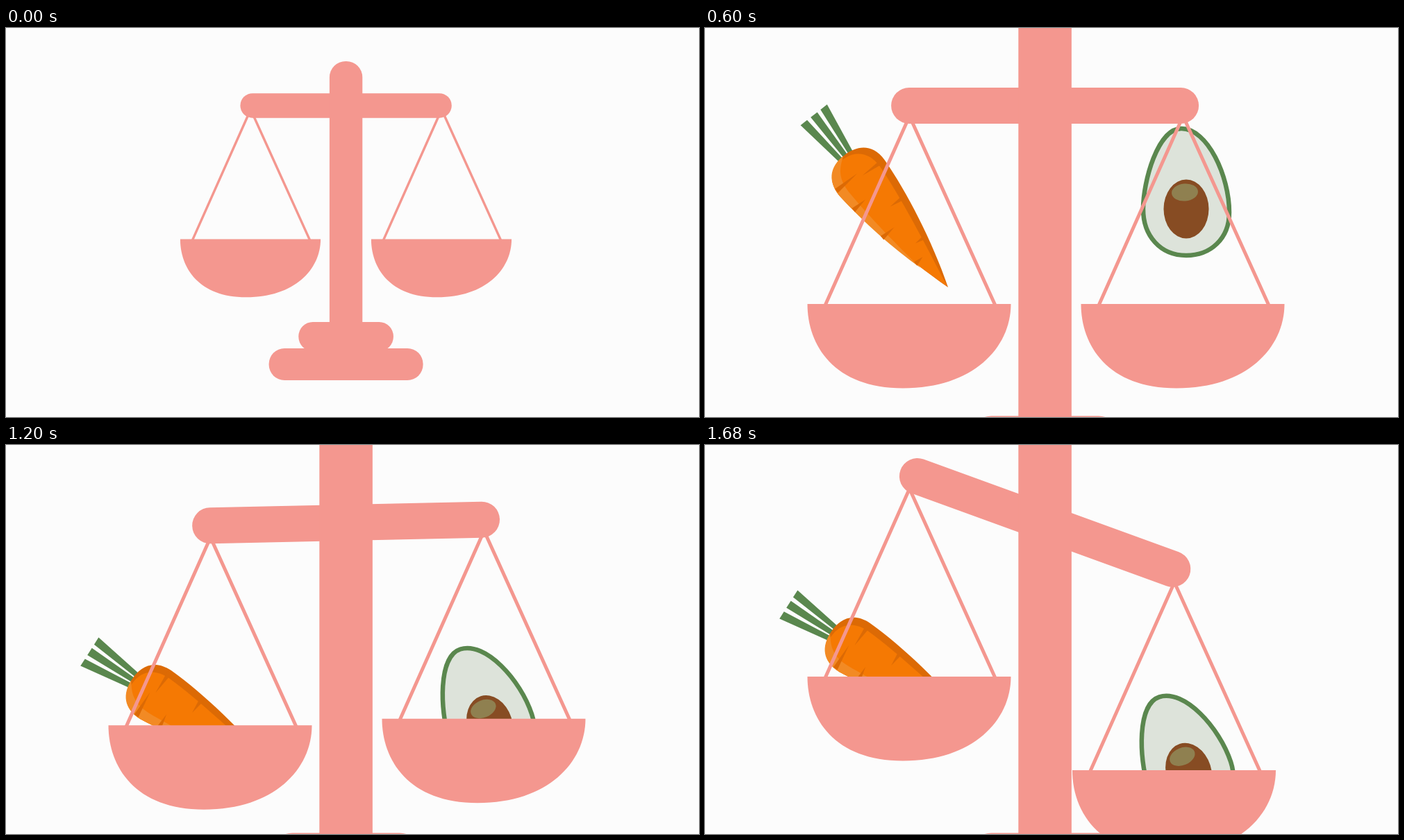
These frames come from a looping animation (998x561 px, 2 s). An HTML page with a canvas:

```html
<!DOCTYPE html>
<html lang="en">
<head>
<meta charset="utf-8">
<title>Balance scale</title>
<style>
html, body { margin: 0; width: 100%; height: 100%; overflow: hidden; background: #fcfcfc; }
canvas { display: block; }
</style>
</head>
<body>
<canvas id="stage" width="998" height="561"></canvas>
<script>
const ctx = document.getElementById('stage').getContext('2d');
const PINK = '#f4978f', GREEN = '#5a874e', DARK = '#dc6a05';
const LOOP = 2000, STEP = 40, LAST = 1680;
const CENTER = 489.6;

const lerp = (a, b, p) => a + (b - a) * p;

// Linear interpolation through [time, value] pairs, clamped at both ends
function track(t, keys) {
  if (t <= keys[0][0]) return keys[0][1];
  for (let i = 1; i < keys.length; i++) {
    const [t0, a] = keys[i - 1], [t1, b] = keys[i];
    if (t <= t1) return lerp(a, b, (t - t0) / (t1 - t0));
  }
  return keys[keys.length - 1][1];
}

const swing = (t, ...values) =>
  track(t, [680, 1020, 1340, 1680].map((time, i) => [time, values[i]]));

function place(x, y, degrees, scale, draw) {
  ctx.save();
  ctx.translate(x, y);
  ctx.rotate(degrees * Math.PI / 180);
  ctx.scale(scale, scale);
  draw();
  ctx.restore();
}

function fill(color, path) {
  ctx.fillStyle = color;
  ctx.fill(new Path2D(path));
}

function stroke(color, width, path) {
  ctx.strokeStyle = color;
  ctx.lineWidth = width;
  ctx.stroke(new Path2D(path));
}

function bar(x, y, w, h, r) {
  ctx.fillStyle = PINK;
  ctx.beginPath();
  ctx.roundRect(x, y, w, h, r);
  ctx.fill();
}

function ellipse(color, x, y, rx, ry, angle = 0) {
  ctx.fillStyle = color;
  ctx.beginPath();
  ctx.ellipse(x, y, rx, ry, angle, 0, Math.PI * 2);
  ctx.fill();
}

// Lies along the x axis, tip on the right
function carrot() {
  for (const [end, base] of [[17.5, 8.5], [-1, 0], [-19, -8.5]])
    fill(GREEN, `M-159,${end - 6}L-159,${end + 6}L-80,${base + 3.5}L-80,${base - 3.5}Z`);
  fill(DARK, 'M156,0C90,-23 10,-38 -45,-41C-75,-42 -86,-22 -86,0C-86,22 -75,42 -45,42C10,38 90,20 156,0Z');
  fill('#f57903', 'M154,0C90,-12 10,-27 -42,-30C-66,-31 -80,-17 -82,0C-86,22 -75,42 -45,42C10,38 90,20 154,0Z');
  fill('#f28a24', 'M-86,2C-86,24 -75,42 -45,42C10,38 60,28 110,14C50,22 0,27 -40,28C-65,28 -76,18 -86,2Z');
  const notches = [[-53, 41, 2], [-46, -38, -2], [-16, 39, 16], [14, -30, -6],
                   [41, 31, 8], [78, -20, -2], [100, 16, 2]];
  for (const [x, edge, inner] of notches)
    fill(DARK, `M${x - 3},${edge}L${x + 4},${edge}L${x - 1},${inner}Z`);
}

function avocado() {
  const skin = 'M-6,-91C32,-91 63,-22 63,30C63,68 36,92 1,92C-36,92 -61,64 -61,25C-61,-15 -40,-91 -6,-91Z';
  fill('#dde3da', skin);
  stroke(GREEN, 6.5, skin);
  ellipse('#874c23', 1, 25, 32.5, 42.5);
  ellipse('#8f8050', -1, 1, 19, 12.5, -0.08);
}

// Origin is the middle of the bowl's rim
function pan() {
  stroke(PINK, 5, 'M-121,2L.5,-271L124,2');
  fill(PINK, 'M-146.5,0C-146.5,60 -108,121.5 -9,121.5C92,121.5 146.5,63 146.5,0Z');
}

function stand(zoom) {
  place(CENTER, lerp(424, 559.5, zoom), 0, lerp(1, 1.615, zoom), () => {
    bar(-23.7, -376, 47.4, 400, [23, 23, 0, 0]);
    bar(-68.3, 0, 136.6, 42, 20.5);
    bar(-111, 38, 222, 46, 22.5);
  });
}

function beam(zoom, tilt) {
  const half = lerp(152.2, 221.5, zoom), thick = lerp(35.5, 52, zoom);
  place(CENTER, 111.9, tilt, 1, () => bar(-half, -thick / 2, half * 2, thick, thick / 2));
}

function render(t) {
  const zoom = Math.min(1, t / 340);
  const rim = lerp(304.5, 398, zoom), size = lerp(0.69, 1, zoom);

  ctx.fillStyle = '#fcfcfc';
  ctx.fillRect(0, 0, 998, 561);

  const carrotY = track(t, [[320, -183], [600, 251], [684, 385], [760, 385], [1030, 348], [1350, 416], [1680, 316]]);
  const carrotTurn = track(t, [[320, 121], [600, 52], [680, 32.5]]);
  const avocadoY = track(t, [[320, -200], [600, 236], [684, 379], [760, 379], [1030, 418], [1350, 345], [1680, 448]]);
  const avocadoTurn = track(t, [[320, 60], [600, 0], [684, -18]]);
  place(254, carrotY, carrotTurn, 1, carrot);
  place(track(t, [[600, 692], [684, 688]]), avocadoY, avocadoTurn, 1, avocado);

  place(lerp(352, 294, zoom), rim + swing(t, 0, -30, 34.5, -64), 0, size, pan);
  place(lerp(627, 688, zoom) + swing(t, 0, 0, 0, -12.5), rim + swing(t, 0, 37, -34.5, 71), 0, size, pan);
  beam(zoom, swing(t, 0, 10, -10, 20));
  stand(zoom);
}

function tick() {
  const t = performance.now() % LOOP;
  render(Math.min(LAST, Math.floor(t / STEP) * STEP));
  requestAnimationFrame(tick);
}
tick();
</script>
</body>
</html>
```
